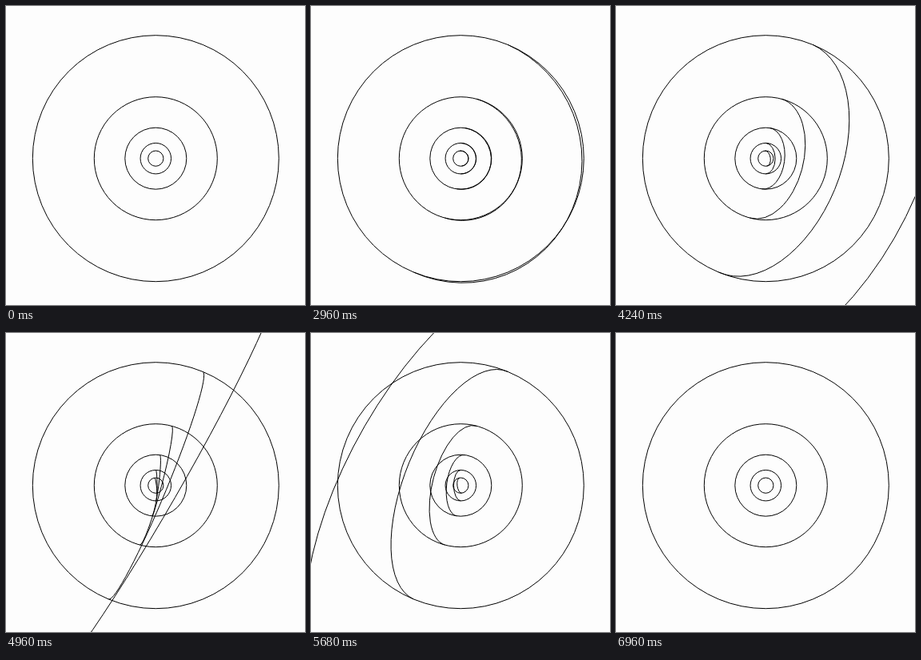
Animation of 374x374 px, one loop 8240 ms. Source, as an HTML page with a canvas:

```html
<!DOCTYPE html>
<html lang="en">
<head>
<meta charset="utf-8">
<title>Turning circles</title>
<style>
  html, body { margin: 0; width: 100%; height: 100%; overflow: hidden; background: #fdfdfd; }
  canvas { display: block; width: 374px; height: 374px; }
</style>
</head>
<body>
<canvas id="stage" width="374" height="374"></canvas>
<script>
const ctx = document.getElementById('stage').getContext('2d');
const SIZE = 374, LOOP = 8240, STEP = 80;
const TURN_START = 2960, TURN_STEPS = 50;
const CENTER = { x: 187.3, y: 190.7 };
const RADII = [9.625, 19.25, 38.5, 77, 154, 308];
const SKEW = 0.03;
const rad = degrees => degrees * Math.PI / 180;

// Strokes an arc of the unit circle mapped onto the axes u and v.
function strokeArc(radius, u, v, end) {
  ctx.setTransform(radius * u.x, radius * u.y, radius * v.x, radius * v.y, CENTER.x, CENTER.y);
  ctx.beginPath();
  ctx.arc(0, 0, 1, 0, end);
  ctx.resetTransform();
  ctx.stroke();
}

// Half circle flipping over its tilted diameter.
function strokeFlap(radius, tilt, turn) {
  const u = { x: Math.sin(tilt), y: -Math.cos(tilt) };
  const n = { x: Math.cos(tilt), y: Math.sin(tilt) };
  const fold = Math.cos(turn);
  const v = { x: fold * (n.x - SKEW * u.x), y: fold * (n.y - SKEW * u.y) };
  strokeArc(radius, u, v, Math.PI);
}

function draw(time) {
  ctx.resetTransform();
  ctx.fillStyle = '#fdfdfd';
  ctx.fillRect(0, 0, SIZE, SIZE);
  ctx.strokeStyle = '#000';
  ctx.lineWidth = 1;

  for (const radius of RADII) {
    strokeArc(radius, { x: 1, y: 0 }, { x: 0, y: 1 }, 2 * Math.PI);
  }

  const step = Math.floor((time - TURN_START) / STEP);
  if (step < 0 || step >= TURN_STEPS) return;
  const turn = rad(step * 3.62 - 5.8);
  RADII.forEach((radius, i) => strokeFlap(radius, rad(7.5 * (i - 1)), turn));
}

const start = performance.now();
function tick() {
  draw((performance.now() - start) % LOOP);
  requestAnimationFrame(tick);
}
tick();
</script>
</body>
</html>
```
